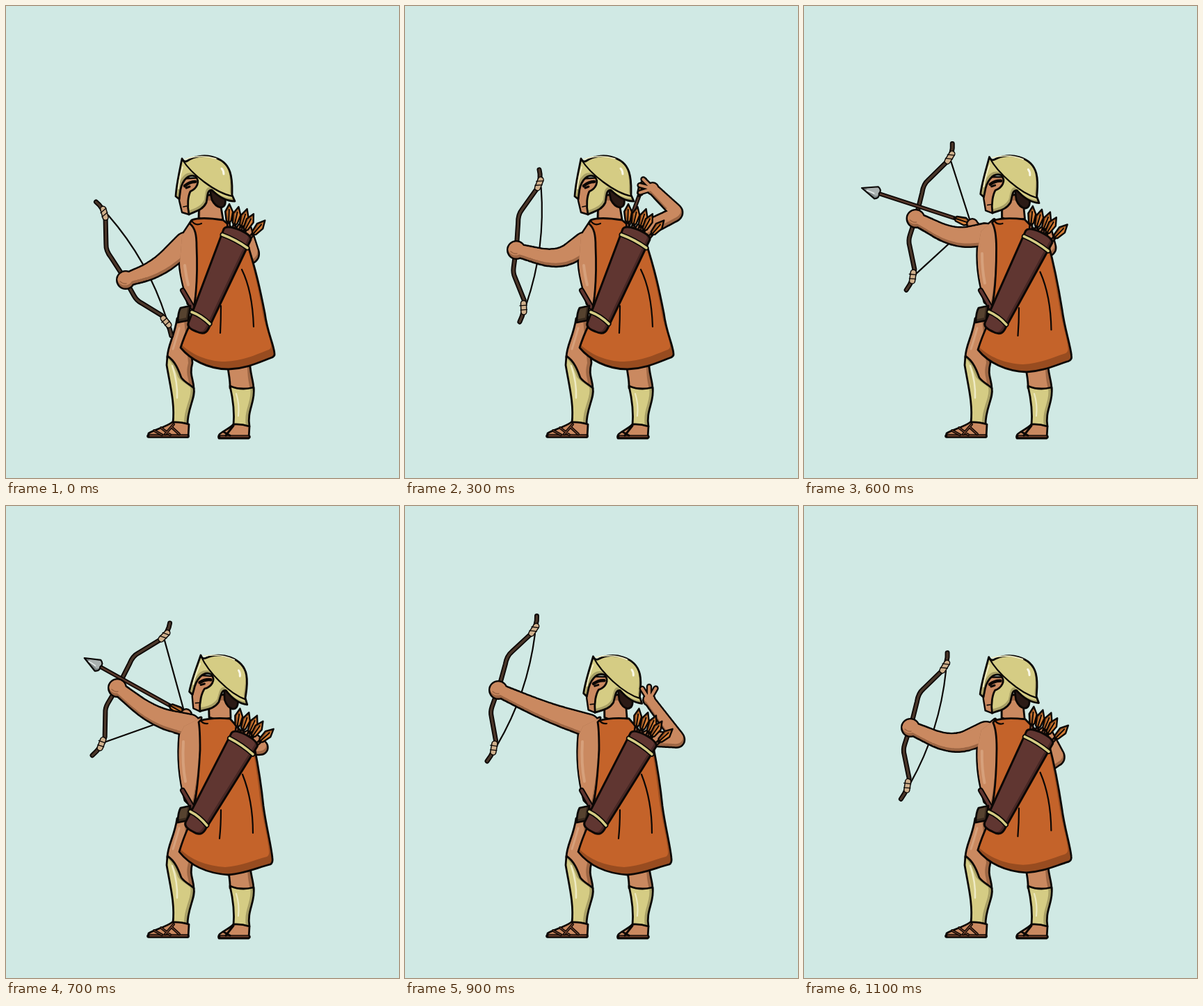
These frames come from a looping animation (565 px wide and 677 px high, 1.2 s). An HTML page with a canvas:

```html
<!DOCTYPE html>
<html lang="en">
<head>
<meta charset="utf-8">
<title>Archer</title>
<style>
html, body { margin: 0; width: 100%; height: 100%; overflow: hidden; background: #d0e9e4; }
canvas { display: block; }
</style>
</head>
<body>
<canvas id="stage" width="565" height="677"></canvas>
<script>
const ctx = document.getElementById('stage').getContext('2d');
const INK = '#0b0705', SKIN = '#ca8960', SKIN_DARK = '#9d6644', SKIN_LIGHT = '#d6a07b';
const GOLD = '#d5cc84', GOLD_DARK = '#a89f65', GOLD_LIGHT = '#efebc4';
const CAPE = '#c4632a', CAPE_DARK = '#984c20', HIDE = '#603631', HIDE_DARK = '#472724';
const WOOD = '#4b372a', FEATHER = '#d67f38', CORD = '#cfb08c', SANDAL = '#70402b';
const STEP = 100, STEPS = 12, RAD = Math.PI / 180;

// step, body turn, head turn, fist x y, bow angle, elbow x y, rear elbow x y, rear hand x y
const KEYS = [
  [0, 0, 0, 172, 393, -29.2, 218, 377, 355, 357, 335, 375],
  [2, 0, 0, 164, 374, -2.6, 222, 371, 374, 285, 338, 284],
  [3, 0, 0, 160, 350, 7.6, 221, 366, 392, 297, 356, 262],
  [4, 0, 0, 160, 349, 6.5, 221, 366, 392, 290, 364, 246],
  [5, 0, 0, 161, 349, 4.8, 221, 366, 338, 350, 320, 360],
  [7, 1, 1, 160, 261, 30.7, 212, 302, 368, 347, 340, 350],
  [8, 1, .82, 135, 261, 18.5, 206, 296, 397, 330, 351, 272],
  [9, 1, .65, 134, 264, 19.2, 205, 296, 395, 337, 351, 278],
  [11, .6, .47, 153, 318, 17.9, 214, 345, 366, 361, 345, 378]
];
// nock x y and heading of the loose arrow, by step
const ARROWS = {
  3: [345, 249, 110], 4: [362, 252, 230],
  5: [203, 341, 184.5], 6: [240, 312, 198], 7: [257, 298, 209]
};
const FINGERS = { 3: 195, 8: -95, 9: -90 };
const QUIVER_ARROWS = [[321, 286, 92], [334, 290, 103], [346, 293, 108], [355, 300, 118], [371, 309, 131]];

const lerp = (a, b, k) => a + (b - a) * k;
const between = (p, q, k) => [lerp(p[0], q[0], k), lerp(p[1], q[1], k)];

function mix(a, b, k) {
  const num = /-?[\d.]+/g, to = b.match(num);
  let i = 0;
  return a.replace(num, v => lerp(+v, +to[i++], k));
}

function poseAt(step) {
  const i = KEYS.findLastIndex(r => r[0] <= step);
  const a = KEYS[i], b = KEYS[i + 1] || a;
  const k = b === a ? 0 : (step - a[0]) / (b[0] - a[0]);
  return a.map((v, n) => lerp(v, b[n], k));
}

const path = d => d instanceof Path2D ? d : new Path2D(d);

function at(x, y, deg, draw) {
  ctx.save();
  ctx.translate(x, y);
  ctx.rotate(deg * RAD);
  draw();
  ctx.restore();
}

function line(d, color = INK, width = 2.2) {
  ctx.strokeStyle = color;
  ctx.lineWidth = width;
  ctx.stroke(path(d));
}

// flat colour with a darker rim where the lit copy does not reach
function paint(d, fill, dark, dx = 0, dy = 0) {
  const p = path(d);
  ctx.fillStyle = dark || fill;
  ctx.fill(p);
  if (!dark) return;
  ctx.save();
  ctx.clip(p);
  ctx.translate(dx, dy);
  ctx.fillStyle = fill;
  ctx.fill(p);
  ctx.restore();
}

function shape(d, fill, dark, dx, dy, width = 2.8) {
  paint(d, fill, dark, dx, dy);
  line(d, INK, width);
}

// several skin parts inside one common outline
function flesh(...parts) {
  parts.forEach(p => line(p, INK, 5));
  parts.forEach(p => paint(p, SKIN, SKIN_DARK, -1, -4));
}

// tapering limb made of discs; round says how early the elbow curve begins
function limb(s, e, w, ws, we, ww, hand, round = .5) {
  const p = new Path2D(), a = between(e, s, round), b = between(e, w, round);
  const disc = ([x, y], r) => { p.moveTo(x + r, y); p.arc(x, y, r, 0, 7); };
  const ra = lerp(we, ws, round), rb = lerp(we, ww, round);
  for (let t = 0; t <= 1; t += 1 / 32) {
    disc(between(s, a, t), lerp(ws, ra, t));
    disc(between(between(a, e, t), between(e, b, t), t), lerp(ra, rb, t));
    disc(between(b, w, t), lerp(rb, ww, t));
  }
  disc(w, hand);
  return p;
}

function legs() {
  shape('M317,500 C318,522 323,535 322,548 L356,550 C356,535 350,530 350,500 Z', SKIN, SKIN_DARK, -3, 14);
  shape('M322,545 Q338,552 356,547 C359,568 346,580 350,603 L327,602 C329,580 326,562 322,545 Z', GOLD, GOLD_DARK, -5, 0);
  line('M331,556 Q336,572 334,588', GOLD_LIGHT, 2);
  shape('M327,600 C321,607 306,612 306,616 L306,620 L349,620 L350,603 Q338,599 327,600 Z', SKIN, SKIN_DARK, 0, -4);
  line('M307,618 L349,618', INK, 5.5);
  line('M309,617.5 L348,617.5', SANDAL, 2);
  line('M313,611 L322,616 M327,602 L316,616', INK, 3);

  shape('M246,448 C242,475 232,487 232,504 L252,536 L270,549 C270,535 263,530 268,512 L262,450 Z', SKIN, SKIN_DARK, -6, 0);
  line('M249,462 Q244,480 240,492', SKIN_LIGHT, 3);
  shape('M232,502 C243,509 248,522 252,533 C257,540 265,543 270,548 C273,562 260,578 261,602 Q250,596 240,598 C243,570 236,545 231,515 Z', GOLD, GOLD_DARK, -5, -1);
  line('M239,516 Q247,540 246,562', GOLD_LIGHT, 2.5);
  shape('M239,597 C230,604 212,608 205,613 L204,617 L262,618 L263,600 Q250,596 239,597 Z', SKIN, SKIN_DARK, 0, -4);
  line('M205,617 L261,617', INK, 5.5);
  line('M207,616.5 L260,616.5', SANDAL, 2);
  for (const [color, width] of [[INK, 4], [SANDAL, 1.4]])
    line('M213,609 L224,615 M223,605 L236,615 M241,600 L229,614 M238,604 L249,614', color, width);
}

function head(k) {
  shape(mix('M278,272 L277,304 Q292,312 312,306 L306,270 Z', 'M291,272 L292,303 Q306,309 323,304 L322,270 Z', k), SKIN, SKIN_DARK, 2, 8);
  at(lerp(253, 280, k), lerp(219, 214, k), 8 * k, () => {
    ctx.translate(-253, -219);
    shape('M293,263 L315,276 Q317,288 309,289 Q301,288 296,278 Z', '#2b1a15');
    shape('M250,248 L249,279 L253,296 L263,299 L285,280 L281,246 Z', SKIN, SKIN_DARK, -4, 0, 2.4);
    line('M257,258 Q264,252 272,252', INK, 4.5);
    line('M259,261 L264,259', INK, 3);
    line('M255,288 L260,287', INK, 1.6);
    shape('M253,219 Q256,225 261,222 C280,209 314,214 322,238 C326,250 325,262 325,271 L329,280 C315,280 305,273 296,264 C289,264 290,272 288,282 C282,294 270,295 263,299 C260,285 262,272 265,266 C274,262 280,252 272,244 C259,240 251,255 250,270 L249,277 L244,273 C245,255 250,235 253,219 Z', GOLD, GOLD_DARK, -3, -4);
    line('M254,221 C266,240 300,268 326,273');
    line('M257,220 Q280,212 302,219', GOLD_LIGHT, 1.6);
    line('M310,233 Q313,236 313,241', '#faf8e6', 3);
    line('M254,231 Q249,248 248,262', GOLD_LIGHT, 1.8);
  });
}

function feather() {
  shape('M-2,0 L9,-5.5 L22,-3.5 L25,0 L22,3.5 L9,5.5 Z', FEATHER, '#9d5622', 0, -3, 2.4);
  line('M6,0 L26,0', INK, 2);
}

function arrow([x, y, deg]) {
  at(x, y, deg, () => {
    line('M0,0 L142,0', INK, 6);
    line('M1,0 L142,0', '#59392c', 2.6);
    feather();
    shape('M165,0 L143,-9 Q136,-6 139,0 Q136,6 143,9 Z', '#aab1b0', '#7d8585', 0, 4, 2.2);
    line('M146,-2 L157,-1', '#dfe5e4', 2);
  });
}

function bow(x, y, deg, nock) {
  at(x, y, deg, () => {
    ctx.translate(18.5, -8.5);
    let pull = 'Q23,0 6,84';
    if (nock) {
      const dx = nock[0] - x, dy = nock[1] - y, c = Math.cos(deg * RAD), s = Math.sin(deg * RAD);
      pull = `L${dx * c + dy * s - 18.5},${dy * c - dx * s + 8.5} L6,84`;
    }
    line('M5,-85 ' + pull);
    const stave = 'M-1,-110 Q4,-98 0,-84 L-18,-50 Q-23,-42 -21,-30 L-19,0 L-19,34 Q-19,42 -15,48 L2,78 Q6,92 0,110';
    line(stave, INK, 7);
    line(stave, WOOD, 3.4);
    for (const d of ['M3,-96 L0,-84', 'M2,83 L4,95']) {
      line(d, INK, 9.5);
      line(d, CORD, 6.6);
    }
    line('M-3,-93 L7,-95 M-4,-87 L6,-89 M-3,87 L7,85 M-1,93 L8,91', INK, 1.3);
  });
}

function rearArm(b, elbow, hand, aim) {
  const tips = aim === undefined ? [] : [-32, 0, 30].map(d => {
    const a = (aim + d) * RAD;
    return `M${hand[0]},${hand[1]} l${Math.cos(a) * 19},${Math.sin(a) * 19}`;
  });
  tips.forEach(d => line(d, INK, 8.5));
  flesh(limb([lerp(342, 350, b), lerp(322, 333, b)], elbow, hand, 10, 8.5, 6.5, 7.5, .12));
  tips.forEach(d => line(d, SKIN, 4));
}

function cape(b) {
  shape(mix(
    'M267,307 Q280,302 312,307 L345,335 C360,380 366,410 372,440 C376,470 384,482 386,498 Q387,503 380,505 C362,512 345,520 320,521 C290,521 265,507 251,490 C255,478 258,470 263,460 C273,435 276,390 274,345 C274,328 272,318 264,312 Z',
    'M279,308 Q295,303 322,305 L357,345 C364,380 368,410 370,430 C374,460 381,485 383,505 Q384,512 380,514 C360,519 345,527 320,529 C290,527 265,516 249,496 C253,483 257,472 262,461 C273,435 277,390 279,350 C279,335 279,320 277,310 Z', b),
    CAPE, CAPE_DARK, -5, -11);
  line(mix('M339,378 C350,400 355,430 356,460', 'M340,385 C350,410 355,440 355,469', b));
  line(mix('M309,430 Q309,450 308,469', 'M309,436 Q309,458 307,477', b));
  line(mix('M267,308 Q272,316 281,312', 'M280,308 Q284,313 290,312', b));
}

function quiver(b) {
  at(274 - 5 * b, 464, 6.6 * b, () => {
    ctx.translate(-274, -464);
    for (const [x, y, deg] of QUIVER_ARROWS) at(x, y, deg, () => {
      line('M20,0 L42,0', INK, 6);
      line('M20,0 L42,0', '#6b4030', 2);
      feather();
    });
    shape('M313,320 Q316,314 333,320 Q353,328 352,335 L291,463 Q286,473 274,467 Q260,462 262,455 Z', HIDE, HIDE_DARK, -4, -2, 3);
    for (const d of ['M311,328 Q330,335 347,347', 'M267,439 Q281,444 293,456']) {
      line(d, INK, 7);
      line(d, GOLD, 3.6);
    }
  });
}

function draw(step) {
  const [, b, h, fx, fy, deg, ex, ey, rx, ry, hx, hy] = poseAt(step);
  const loose = ARROWS[step], nocked = loose && step > 4;
  const shoulder = [lerp(258, 264, b), lerp(341, 315, b)];
  ctx.fillStyle = '#d0e9e4';
  ctx.fillRect(0, 0, 565, 677);

  legs();
  head(h);
  if (loose && !nocked) arrow(loose);
  rearArm(b, [rx, ry], [hx, hy], FINGERS[step]);

  bow(fx, fy, deg, step > 5 && nocked ? loose : null);
  if (nocked) {
    arrow(loose);
    const hand = [loose[0] + 2, loose[1] + 1], start = [shoulder[0] - 2, shoulder[1] - 3];
    const [mx, my] = between(start, hand, .45);
    flesh(limb(start, [mx, my + 6], hand, 12, 8.5, 5.5, 6.5));
  }
  flesh(
    limb(shoulder, [ex, ey], [fx, fy], 15, 12, 8, 11.5),
    path(mix(
      'M267,309 L253,330 L250,368 C251,390 257,405 262,427 L270,432 C277,400 275,350 274,316 Z',
      'M280,304 L256,316 L250,328 C246,370 252,400 258,422 L268,432 C276,400 281,350 279,310 Z', b)));
  line(mix('M257,372 Q259,388 262,400', 'M255,338 Q253,370 258,395', b), SKIN_LIGHT, 4);
  line(`M${fx - 8},${fy + 2} q4,4 9,3`, SKIN_DARK, 1.5);

  line('M254,408 L268,432', INK, 8);
  line('M254,408 L268,432', HIDE, 4);
  shape('M251,433 L265,430 L262,451 L247,454 Q247,440 251,433 Z', '#56422f', '#382a1e', -3, -4);
  cape(b);
  quiver(b);
}

ctx.lineJoin = ctx.lineCap = 'round';

function tick() {
  draw(Math.floor(performance.now() / STEP) % STEPS);
  requestAnimationFrame(tick);
}
tick();
</script>
</body>
</html>
```
